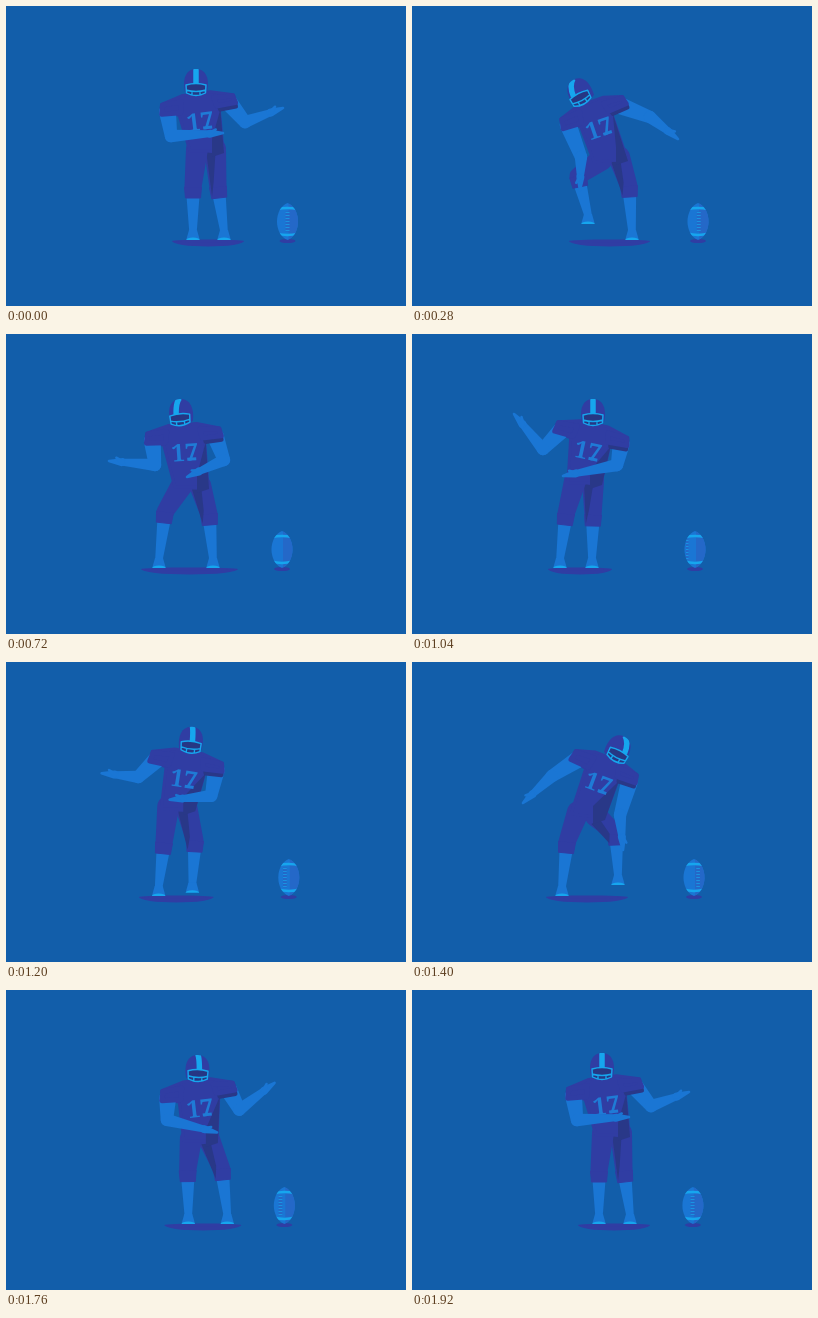
Animation, 400 px wide and 300 px high, one loop 1960 ms. Source, as an HTML page with a canvas:

```html
<!DOCTYPE html>
<html lang="en">
<head>
<meta charset="utf-8">
<title>Football dance</title>
<style>
  html, body { margin: 0; width: 100%; height: 100%; overflow: hidden; background: #125eaa; }
  canvas { display: block; width: 400px; height: 300px; }
</style>
</head>
<body>
<canvas id="stage" width="400" height="300"></canvas>
<script>
const ctx = document.getElementById('stage').getContext('2d');
const LOOP = 1960, STEP = 40, MIRROR = 371;
const C = {
  sky: '#125eaa', skin: '#1a76d4', kit: '#303da3', shade: '#293888',
  cyan: '#16a6ee', digit: '#1f7bd6', face: '#263784', dim: '#2468c8'
};

// Head is x, y, tilt, turn; joint pairs are [left x, left y, right x, right y] as seen on screen.
const point = {
  head: [190, 77, 0, 0], shadow: [166, 238],
  shoulder: [158, 102, 226, 93], elbow: [165, 130, 239, 116], hand: [217, 127, 277, 102],
  hip: [191, 143, 209, 143], knee: [187, 181, 212, 181], foot: [187, 233, 218, 233]
};
const step = {
  head: [168, 86, -28, -8], shadow: [157, 238],
  shoulder: [152, 116, 210, 95], elbow: [169, 151, 238, 111], hand: [168, 184, 266, 133],
  hip: [189, 154, 207, 151], knee: [166, 170, 217, 180], foot: [176, 217, 220, 233]
};
const plant = {
  head: [206, 87, 28, 8], shadow: [134, 216],
  shoulder: [164, 93, 222, 116], elbow: [140, 114, 208, 153], hand: [111, 141, 211, 188],
  hip: [166, 150, 184, 154], knee: [155, 180, 204, 172], foot: [150, 233, 206, 222]
};
const lean = {
  head: [204, 79, 17, 5], shadow: [140, 238],
  shoulder: [162, 93, 228, 102], elbow: [153, 119, 221, 140], hand: [176, 151, 257, 163],
  hip: [176, 152, 194, 152], knee: [167, 180, 204, 180], foot: [156, 233, 217, 233]
};
const sweep = {
  head: [175, 79, -6, -5], shadow: [135, 232],
  shoulder: [143, 103, 212, 98], elbow: [149, 131, 218, 126], hand: [103, 127, 181, 143],
  hip: [176, 151, 194, 151], knee: [159, 178, 203, 180], foot: [153, 233, 207, 233]
};
const raise = {
  head: [181, 79, 0, 0], shadow: [136, 200],
  shoulder: [147, 92, 213, 107], elbow: [131, 115, 205, 131], hand: [102, 80, 151, 142],
  hip: [163, 147, 181, 147], knee: [154, 180, 181, 181], foot: [148, 233, 180, 233]
};

const mirror = pose => Object.fromEntries(Object.entries(pose).map(([name, v]) => {
  if (name === 'head') return [name, [MIRROR - v[0], v[1], -v[2], -v[3]]];
  if (name === 'shadow') return [name, [MIRROR - v[1], MIRROR - v[0]]];
  return [name, [MIRROR - v[2], v[3], MIRROR - v[0], v[1]]];
}));

const dance = [
  [0, point], [280, step], [390, mirror(plant)], [600, mirror(lean)],
  [720, sweep], [1040, raise], [1160, mirror(point)], [1300, mirror(step)],
  [1400, plant], [1600, lean], [1680, mirror(sweep)], [1820, mirror(raise)], [1920, point]
];
const fields = Object.keys(point);
const flat = dance.map(([t, pose]) => [t, ...fields.flatMap(f => pose[f])]);
const shift = (key, dt) => [key[0] + dt, ...key.slice(1)];
const bodyKeys = [shift(flat[flat.length - 1], -LOOP), ...flat, shift(flat[0], LOOP), shift(flat[1], LOOP)];

// time, x, spin in degrees
const ballKeys = [
  [-360, 277, -70], [0, 281.5, 0], [280, 286, 5], [720, 276, 180], [1040, 283, 300],
  [1400, 282, 387], [1600, 277, 650], [1960, 281.5, 720], [2240, 286, 725]
];

// Cubic through the keys that never overshoots them.
function sample(keys, t) {
  let i = 1;
  while (keys[i + 1][0] <= t) i++;
  const [a, b, c, d] = [keys[i - 1], keys[i], keys[i + 1], keys[i + 2]];
  const span = c[0] - b[0], s = (t - b[0]) / span, r = 1 - s;
  const rate = (p, q, k) => (q[k] - p[k]) / (q[0] - p[0]);
  const blend = (m, n) => m * n <= 0 ? 0 : 2 * m * n / (m + n);
  return b.slice(1).map((v, j) => {
    const k = j + 1, mid = rate(b, c, k);
    const m0 = blend(rate(a, b, k), mid), m1 = blend(mid, rate(c, d, k));
    return v * (1 + 2 * s) * r * r + c[k] * s * s * (3 - 2 * s) + span * s * r * (m0 * r - m1 * s);
  });
}

function poseAt(t) {
  const values = sample(bodyKeys, t), pose = {};
  for (const f of fields) pose[f] = values.splice(0, point[f].length);
  return pose;
}

function poly(color, points, round = 0) {
  ctx.beginPath();
  points.forEach(p => ctx.lineTo(p[0], p[1]));
  ctx.closePath();
  ctx.fillStyle = ctx.strokeStyle = color;
  ctx.fill();
  if (round) {
    ctx.lineWidth = round;
    ctx.lineJoin = 'round';
    ctx.stroke();
  }
}

function oval(color, x, y, rx, ry, from = 0, to = Math.PI * 2) {
  ctx.beginPath();
  ctx.ellipse(x, y, rx, ry, 0, from, to);
  ctx.fillStyle = color;
  ctx.fill();
}

// Tapered capsule between two circles.
function limb(color, a, b, ra, rb) {
  const dx = b[0] - a[0], dy = b[1] - a[1], len = Math.hypot(dx, dy) || 1;
  const ang = Math.atan2(dy, dx), off = Math.acos(Math.max(-1, Math.min(1, (ra - rb) / len)));
  ctx.beginPath();
  ctx.arc(a[0], a[1], ra, ang + off, ang - off + Math.PI * 2);
  ctx.arc(b[0], b[1], rb, ang - off, ang + off);
  ctx.closePath();
  ctx.fillStyle = color;
  ctx.fill();
}

const side = (pair, i) => pair.slice(i * 2, i * 2 + 2);
const along = (p, u, a, b) => [p[0] + u[0] * a - u[1] * b, p[1] + u[1] * a + u[0] * b];
function unit(a, b) {
  const len = Math.hypot(b[0] - a[0], b[1] - a[1]) || 1;
  return [(b[0] - a[0]) / len, (b[1] - a[1]) / len];
}

function drawLeg(pose, i) {
  const hip = side(pose.hip, i), knee = side(pose.knee, i), foot = side(pose.foot, i);
  const u = unit(knee, foot), [x, y] = foot;
  limb(C.skin, knee, [x, y - 8], 7.2, 3.8);
  poly(C.skin, [[x - 4, y - 9], [x + 4, y - 9], [x + 6.5, y], [x - 6.5, y]]);
  oval(C.cyan, x, y + 1, 6.8, 2.6, Math.PI, 0);
  limb(C.kit, hip, knee, 11, 8.5);
  poly(C.kit, [along(knee, u, 0, 8.5), along(knee, u, 11, 7.5), along(knee, u, 11, -7.5), along(knee, u, 0, -8.5)], 1);
  if (i) {
    const v = unit(hip, knee);
    poly(C.shade, [along(hip, v, 2, 9), along(hip, v, 5, 0), along(knee, v, -5, 4), along(knee, u, 9, 7)]);
  }
}

function drawArm(pose, i, u) {
  const root = along(side(pose.shoulder, i), u, i ? -3 : 3, 4);
  const elbow = side(pose.elbow, i), hand = side(pose.hand, i);
  const v = unit(elbow, hand), wrist = along(hand, v, -13, 0);
  limb(C.skin, root, elbow, 8.5, 6.2);
  limb(C.skin, elbow, wrist, 6.2, 3.4);
  limb(C.skin, wrist, hand, 4, 1.3);
  limb(C.skin, wrist, along(wrist, v, 6, v[0] > 0 ? -4 : 4), 2.5, 1.2);
}

function drawTorso(pose, left, right, mid, u) {
  const [hl, hr] = [side(pose.hip, 0), side(pose.hip, 1)];
  const pit = along(right, u, -14, 9), low = [hr[0] + 8, hr[1] + 2];
  poly(C.kit, [
    along(left, u, -4, 6), along(left, u, -2, -4), along(mid, u, -14, -10), along(mid, u, 14, -10),
    along(right, u, 2, -4), along(right, u, 4, 6), pit, low,
    [hl[0] - 7, hl[1] + 2], along(left, u, 14, 9)
  ], 3);
  poly(C.shade, [along(pit, u, 1, 0), [low[0] + 1, low[1] + 2], [low[0] - 11, low[1] + 6], [low[0] - 11, low[1] - 12]]);
}

function drawPads(left, right, u) {
  poly(C.kit, [along(left, u, -3, 6), along(left, u, -1, -3), along(left, u, 18, -4), along(left, u, 16, 7)], 5);
  poly(C.shade, [along(right, u, 3, 8), along(right, u, 2, 0), along(right, u, -15, 2), along(right, u, -13, 9)], 4);
  poly(C.kit, [along(right, u, 3, 4), along(right, u, 1, -3), along(right, u, -18, -4), along(right, u, -16, 5)], 5);
}

function drawNumber(mid, u) {
  const p = along(mid, u, 0, 18);
  ctx.save();
  ctx.translate(p[0], p[1]);
  ctx.rotate(Math.atan2(u[1], u[0]) * 0.95);
  ctx.font = '900 24px "Noto Serif", "Liberation Serif", serif';
  ctx.textAlign = 'center';
  ctx.fillStyle = C.digit;
  ctx.fillText('17', 0, 8.5);
  ctx.fillRect(2, 5.5, 9, 3);
  ctx.restore();
}

function drawHead([x, y, tilt, turn]) {
  ctx.save();
  ctx.translate(x, y);
  ctx.rotate(tilt * Math.PI / 180);
  ctx.beginPath();
  ctx.moveTo(-11, 9);
  ctx.bezierCurveTo(-14, -4, -10, -14, 0, -14);
  ctx.bezierCurveTo(10, -14, 14, -4, 11, 9);
  ctx.quadraticCurveTo(0, 16, -11, 9);
  ctx.fillStyle = C.kit;
  ctx.fill();
  ctx.save();
  ctx.clip();
  ctx.beginPath();
  ctx.moveTo(0, -15);
  ctx.quadraticCurveTo(turn * 0.9, -10, turn, 2);
  ctx.strokeStyle = C.cyan;
  ctx.lineWidth = 5.5;
  ctx.stroke();
  ctx.restore();
  ctx.translate(turn * 0.3, 0);
  poly(C.face, [[-8, 2], [8, 2], [9, 8], [5, 11], [-5, 11], [-9, 8]], 2);
  ctx.beginPath();
  ctx.moveTo(-10, 2);
  ctx.quadraticCurveTo(0, -1, 10, 2);
  ctx.lineTo(9.5, 10);
  ctx.quadraticCurveTo(0, 15, -9.5, 10);
  ctx.closePath();
  ctx.moveTo(-10, 7);
  ctx.quadraticCurveTo(0, 10, 10, 7);
  for (const bar of [-4, 4]) {
    ctx.moveTo(bar, 8.5);
    ctx.lineTo(bar, 12);
  }
  ctx.strokeStyle = C.cyan;
  ctx.lineWidth = 1.4;
  ctx.stroke();
  ctx.restore();
}

function drawBall([x, spin]) {
  const a = spin * Math.PI / 180;
  oval(C.kit, x, 235, 8, 2);
  ctx.save();
  ctx.translate(x, 215.5);
  ctx.beginPath();
  ctx.moveTo(0, -18.5);
  ctx.bezierCurveTo(14, -13, 14, 13, 0, 18.5);
  ctx.bezierCurveTo(-14, 13, -14, -13, 0, -18.5);
  ctx.clip();
  ctx.fillStyle = C.skin;
  ctx.fillRect(-12, -20, 24, 40);
  ctx.fillStyle = C.dim;
  ctx.fillRect(1, -20, 12, 40);
  ctx.strokeStyle = C.cyan;
  ctx.lineWidth = 2.4;
  for (const s of [-1, 1]) {
    ctx.beginPath();
    ctx.moveTo(-11, s * 12);
    ctx.quadraticCurveTo(0, s * 15, 11, s * 12);
    ctx.stroke();
  }
  const depth = Math.cos(a);
  if (depth > 0) {
    const lx = 9 * Math.sin(a), w = 0.5 + 1.5 * depth;
    ctx.fillStyle = C.dim;
    ctx.fillRect(lx - w, -10, w * 2, 20);
    ctx.globalAlpha = 0.7;
    ctx.lineWidth = 1;
    ctx.beginPath();
    for (let y = -9; y <= 9; y += 3) {
      ctx.moveTo(lx - w, y);
      ctx.lineTo(lx + w, y);
    }
    ctx.stroke();
  }
  ctx.restore();
}

function draw(t) {
  const pose = poseAt(t), [x1, x2] = pose.shadow;
  const left = side(pose.shoulder, 0), right = side(pose.shoulder, 1);
  const mid = [(left[0] + right[0]) / 2, (left[1] + right[1]) / 2], u = unit(left, right);
  ctx.fillStyle = C.sky;
  ctx.fillRect(0, 0, 400, 300);
  drawBall(sample(ballKeys, t));
  const cx = (x1 + x2) / 2, rx = (x2 - x1) / 2;
  oval(C.kit, cx, 235, rx, 5.5, 0, Math.PI);
  oval(C.kit, cx, 235, rx, 1.5);
  drawLeg(pose, 1);
  drawLeg(pose, 0);
  drawTorso(pose, left, right, mid, u);
  drawNumber(mid, u);
  drawArm(pose, 0, u);
  drawArm(pose, 1, u);
  drawPads(left, right, u);
  drawHead(pose.head);
}

const start = performance.now();
function tick() {
  const t = (performance.now() - start) % LOOP;
  draw(Math.floor(t / STEP) * STEP);
  requestAnimationFrame(tick);
}
tick();
</script>
</body>
</html>
```
